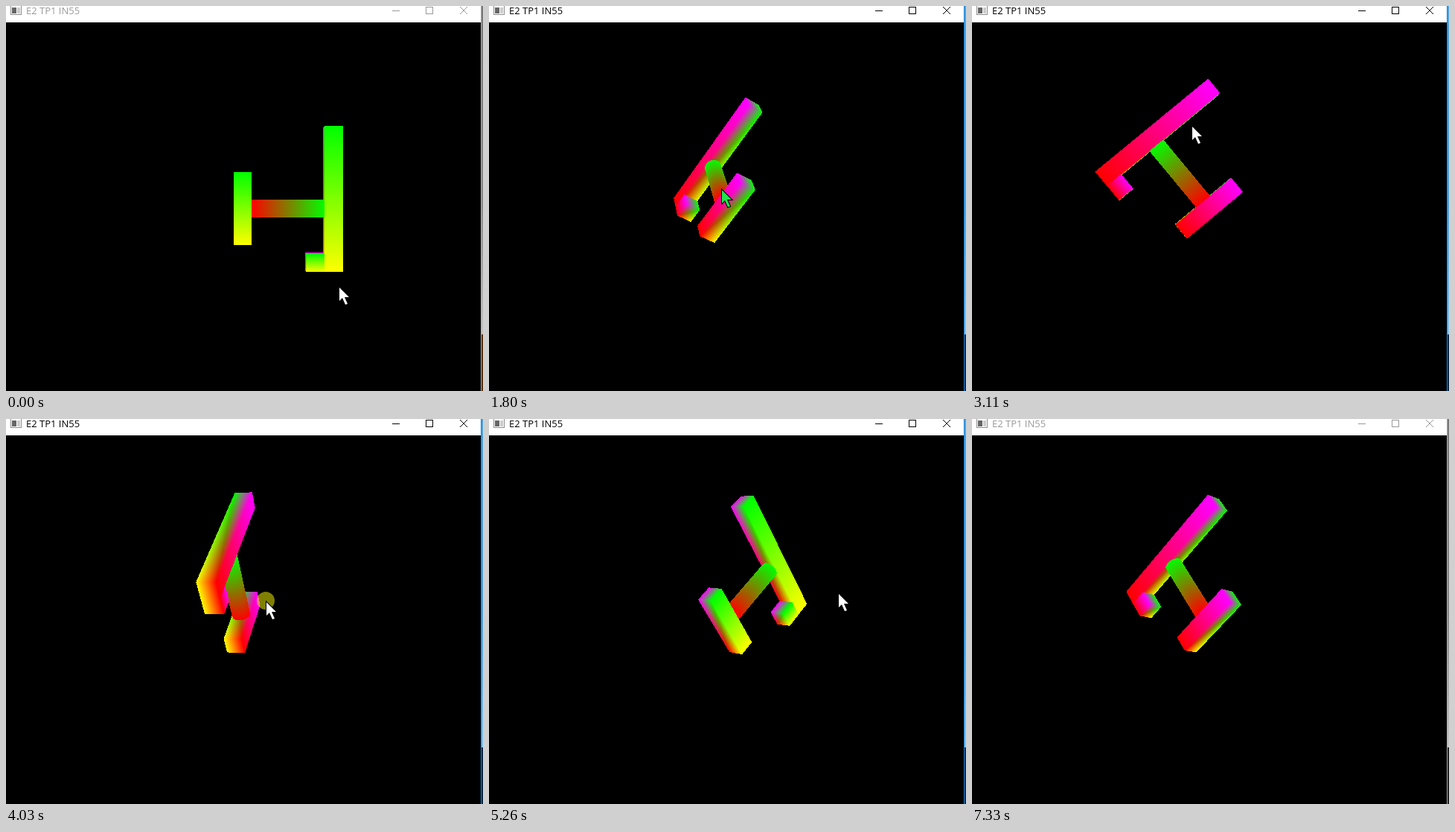
An HTML page with a canvas that plays this animation: 641x517 px, repeating every 7410 ms.

```html
<!DOCTYPE html>
<html lang="en">
<head>
<meta charset="utf-8">
<title>E2 TP1 IN55</title>
<style>
  html, body { margin: 0; width: 641px; height: 517px; overflow: hidden; background: #000; }
  canvas, svg { position: absolute; left: 0; top: 0; display: block; }
  text { font: 13px "Open Sans", "Noto Sans", sans-serif; }
  #arrow { stroke: #000; stroke-width: 2px; paint-order: stroke; }
</style>
</head>
<body>
<canvas id="view" width="638" height="517"></canvas>
<svg width="641" height="517" viewBox="0 0 641 517">
  <defs>
    <linearGradient id="idle" x1="0" y1="0" x2="0" y2="1">
      <stop offset="0" stop-color="#777"/>
      <stop offset=".6" stop-color="#888"/>
      <stop offset="1" stop-color="#c4c4c4"/>
    </linearGradient>
    <linearGradient id="lit" x1="0" y1="0" x2="0" y2="1">
      <stop offset="0" stop-color="#4aa3e0"/>
      <stop offset=".6" stop-color="#4aa3e0"/>
      <stop offset="1" stop-color="#7cc0ee"/>
    </linearGradient>
  </defs>
  <rect width="638" height="22" fill="#fff"/>
  <g shape-rendering="crispEdges">
    <rect x="6.5" y="-.5" width="14" height="12" fill="#fff" stroke="#8c8c8c"/>
    <rect x="8" y="2" width="6" height="8" fill="#666"/>
    <rect x="15" y="2" width="4" height="8" fill="#ccc"/>
  </g>
  <g id="chrome">
    <text x="27" y="11">E2 TP1 IN55</text>
    <path d="M519 6.5h10M564.5 1.5h9v9h-9z" fill="none" stroke="currentColor" shape-rendering="crispEdges"/>
    <path d="M610 1l10 10M620 1l-10 10" fill="none" stroke="currentColor"/>
  </g>
  <rect id="edge" x="638" width="1" height="517"/>
  <rect id="side" x="639" width="2" height="441"/>
  <rect id="foot" x="639" y="441" width="2" height="76"/>
  <g id="mouse">
    <circle id="press" cx="-1" cy="-2" r="12" fill="#ff0" fill-opacity=".5"/>
    <path id="arrow" d="M0 0V18L4 14 8 23 11 22 7 13H13Z"/>
  </g>
</svg>
<script>
const LOOP = 7410, W = 638, H = 517;
const CX = 318, CY = 271.7, FOCAL = 968, EYE = 20;
const $ = id => document.getElementById(id);

// vector helpers
const dot = (a, b) => a[0] * b[0] + a[1] * b[1] + a[2] * b[2];
const cross = (a, b) => [
  a[1] * b[2] - a[2] * b[1], a[2] * b[0] - a[0] * b[2], a[0] * b[1] - a[1] * b[0]];
const scale = (a, k) => a.map(v => v * k);
const add = (...vs) => [0, 1, 2].map(i => vs.reduce((s, v) => s + v[i], 0));
const unit = a => scale(a, 1 / Math.hypot(...a));

// orientation as three orthonormal axes
function basis(x, y) {
  const X = unit(x);
  const Y = unit(add(y, scale(X, -dot(X, y))));
  return [X, Y, cross(X, Y)];
}

function spin(v, axis, angle) {
  const c = Math.cos(angle);
  return add(scale(v, c), scale(cross(axis, v), Math.sin(angle)),
             scale(axis, dot(axis, v) * (1 - c)));
}

function between(a, b, u) {
  if (u === 0) return a;
  const trace = a.reduce((s, v, i) => s + dot(v, b[i]), 0);
  const axis = unit(add(...a.map((v, i) => cross(v, b[i]))));
  const angle = Math.acos(Math.max(-1, Math.min(1, (trace - 1) / 2)));
  return a.map(v => spin(v, axis, angle * u));
}

const poses = [
  basis([1, 0, 0], [0, 1, 0]),
  basis([-.169, .553, -.816], [.541, .715, .372]),
  basis([-.638, .768, .05], [.772, .634, -.06]),
  basis([-.17, .754, .634], [.22, .6475, -.73]),
  basis([.572, .671, -.472], [-.432, .735, .523]),
  basis([-.17, .72, -.673], [.374, .672, .624]),
  basis([-.458, .739, -.494], [.624, .66, .419])
];

// time -> position along the pose list
const turn = [[0, 0], [842, 0], [1800, 1], [2340, 1.67], [2650, 2], [3460, 2], [4030, 3],
  [5250, 4], [6180, 4.8], [6410, 5], [6950, 5.63], [7325, 6], [LOOP, 6]];

// time -> pointer tip
const path = [[0, 448, 378], [400, 500, 350], [790, 557, 290], [1570, 367, 240], [1800, 313, 247],
  [2340, 300, 200], [3110, 296, 162], [3460, 300, 170], [4030, 350, 246], [4640, 465, 246],
  [4950, 537, 150], [5255, 470, 236], [5410, 495, 57], [5560, 520, 46], [5900, 560, 505],
  [6180, 601, 71], [6410, 626, 367], [6560, 640, 517], [LOOP, 640, 560]];

function sample(table, t) {
  const i = Math.max(1, table.findIndex(row => row[0] >= t));
  const a = table[i - 1], b = table[i], u = (t - a[0]) / (b[0] - a[0]);
  return a.slice(1).map((v, n) => v + (b[n + 1] - v) * u);
}

// model: triangles of [point, colour]
const triangles = [];
const quad = (a, b, c, d) => triangles.push([a, b, c], [a, c, d]);
const GREEN = [0, 255, 0], YELLOW = [255, 255, 0], MAGENTA = [255, 0, 255], RED = [255, 0, 0];

function box(x0, x1, y0, y1) {
  const ring = x => [
    [[x, y1, .25], GREEN], [[x, y0, .25], YELLOW], [[x, y0, -.25], RED], [[x, y1, -.25], MAGENTA]];
  const a = ring(x0), b = ring(x1);
  quad(...a);
  quad(...b);
  for (let i = 0; i < 4; i++) {
    const j = (i + 1) % 4;
    quad(a[i], a[j], b[j], b[i]);
  }
}

function rod(x0, x1, r, sides) {
  const at = (x, i, colour) => {
    const q = i / sides * 2 * Math.PI;
    return [[x, r * Math.cos(q), r * Math.sin(q)], colour];
  };
  for (let i = 0; i < sides; i++)
    quad(at(x0, i, RED), at(x0, i + 1, RED), at(x1, i + 1, GREEN), at(x1, i, GREEN));
}

box(-.25, .25, -1, 1);
box(2.25, 2.75, -1.75, 2.25);
box(1.75, 2.25, -1.75, -1.25);
rod(.25, 2.27, .25, 32);

// software rasteriser with a depth buffer
const ctx = $("view").getContext("2d");
const image = ctx.createImageData(W, H);
const pixels = new Uint32Array(image.data.buffer);
const depth = new Float32Array(W * H);

function project([p, colour], axes) {
  const v = add(...axes.map((a, i) => scale(a, p[i])));
  const k = 1 / (EYE - v[2]);
  return { x: CX + FOCAL * v[0] * k, y: CY - FOCAL * v[1] * k, k, colour };
}

function fill(a, b, c) {
  const area = (b.x - a.x) * (c.y - a.y) - (c.x - a.x) * (b.y - a.y);
  if (Math.abs(area) < 1e-6) return;
  const xs = [a.x, b.x, c.x], ys = [a.y, b.y, c.y];
  const left = Math.max(0, Math.floor(Math.min(...xs))), right = Math.min(W - 1, Math.ceil(Math.max(...xs)));
  const top = Math.max(0, Math.floor(Math.min(...ys))), bottom = Math.min(H - 1, Math.ceil(Math.max(...ys)));
  for (let y = top; y <= bottom; y++) {
    for (let x = left; x <= right; x++) {
      const px = x + .5, py = y + .5;
      const u = ((b.x - px) * (c.y - py) - (c.x - px) * (b.y - py)) / area;
      const v = ((c.x - px) * (a.y - py) - (a.x - px) * (c.y - py)) / area;
      const w = 1 - u - v;
      if (u < 0 || v < 0 || w < 0) continue;
      const k = u * a.k + v * b.k + w * c.k, n = y * W + x;
      if (k <= depth[n]) continue;
      depth[n] = k;
      const mix = i => Math.round(u * a.colour[i] + v * b.colour[i] + w * c.colour[i]);
      pixels[n] = (255 << 24 | mix(2) << 16 | mix(1) << 8 | mix(0)) >>> 0;
    }
  }
}

function drawModel(t) {
  const [s] = sample(turn, t);
  const i = Math.min(Math.floor(s), poses.length - 2);
  const axes = between(poses[i], poses[i + 1], s - i);
  depth.fill(0);
  pixels.fill(0xff000000);
  for (const tri of triangles) fill(...tri.map(p => project(p, axes)));
  ctx.putImageData(image, 0, 0);
}

function paint(id, colour) { $(id).setAttribute("fill", colour); }

function drawWindow(t) {
  const active = t >= 430 && t < 7100;
  const ink = active ? "#000" : "#999";
  paint("chrome", ink);
  $("chrome").style.color = ink;
  paint("edge", active ? "#1883d7" : "#aaa");
  paint("side", active ? "url(#lit)" : "url(#idle)");
  paint("foot", active ? "#04284c" : t < 430 ? "#5a3200" : "#222");

  const [x, y] = sample(path, t).map(Math.round);
  $("mouse").setAttribute("transform", `translate(${x} ${y})`);
  $("mouse").style.display = t < 6600 ? "" : "none";
  $("press").style.display = t >= 3940 && t < 4180 ? "" : "none";
  paint("arrow", t > 1700 && t < 1900 ? "#1ee64b" : "#fff");
}

// the picture advances in short steps
function stepTime(t) {
  return t < 880 ? Math.min(11, Math.floor(t / 71)) * 71.5
                 : Math.floor((t + 45) / 76.8) * 76.8 - 43;
}

let last = -1;
function tick() {
  const t = Math.min(stepTime(performance.now() % LOOP), LOOP);
  if (t !== last) {
    last = t;
    drawModel(t);
    drawWindow(t);
  }
  requestAnimationFrame(tick);
}
tick();
</script>
</body>
</html>
```
